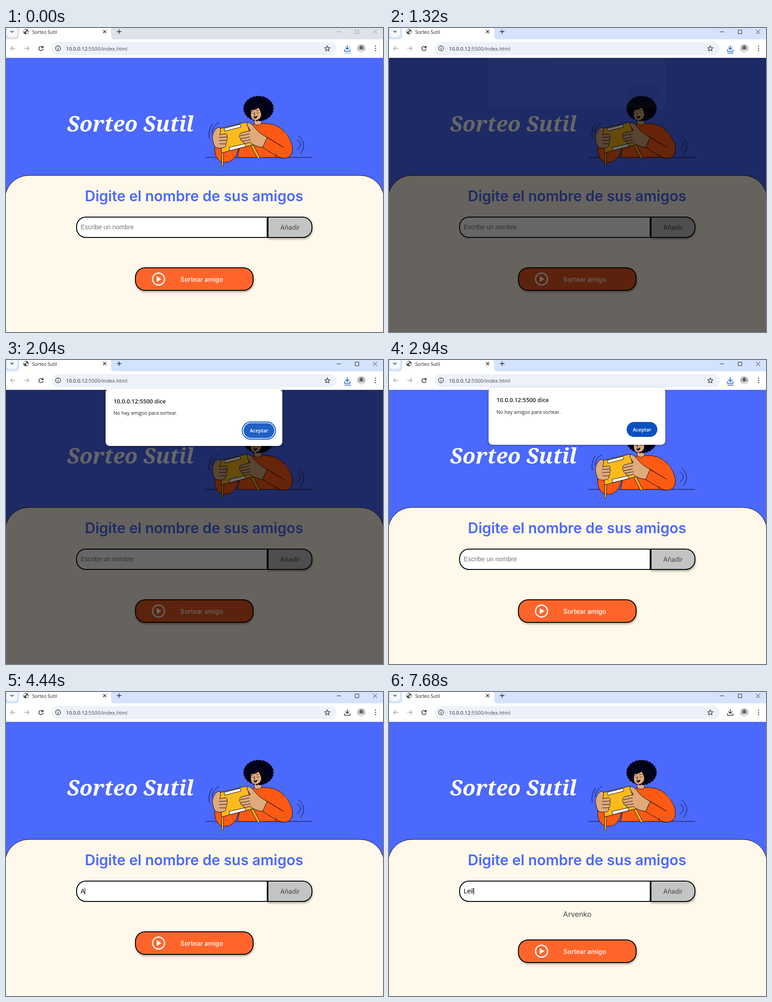
These frames come from a looping animation (833x672 px, 8000 ms). An HTML page:

```html
<!DOCTYPE html>
<html lang="es">
<head>
<meta charset="utf-8">
<title>Sorteo Sutil</title>
<style>
html, body { margin: 0; width: 100%; height: 100%; overflow: hidden; background: #fff9eb; }
svg { display: block; width: 833px; height: 672px; font-optical-sizing: none; }
.ui { font-family: "Open Sans", "Noto Sans", sans-serif; fill: #1f1f1f; }
.inter { font-family: Inter, sans-serif; }
.field { font: 14px "Liberation Sans", Arial, sans-serif; }
.title { font: italic 900 47px "Noto Serif", serif; }
.mid { text-anchor: middle; }
.line { fill: none; stroke-linecap: round; stroke-linejoin: round; }
.art { stroke: #0a0a1c; stroke-width: 1; stroke-linejoin: round; stroke-linecap: round; }
.skin { fill: #e0aa7a; }
.cloth { fill: #ff5a14; }
.wood { fill: #fcba1c; }
.soft { filter: drop-shadow(1px 3px 2px rgba(0, 0, 0, .3)); }
.popup { filter: drop-shadow(0 1px 2px rgba(0, 0, 0, .4)); }
</style>
</head>
<body>
<svg viewBox="0 0 833 672">
  <!-- page -->
  <rect y="66" width="833" height="606" fill="#4b69fd"/>
  <text class="title mid" x="275" y="229" fill="#fff">Sorteo Sutil</text>

  <g class="art">
    <path d="M441 286H676" fill="none"/>
    <path class="cloth" d="M512 286L516 262Q522 230 548 212Q556 216 565 211Q596 209 614 228Q634 250 633 270Q630 288 611 288L597 286Z"/>
    <path class="cloth" d="M461 263Q460 287 474 295Q490 301 502 290Q510 282 514 266L480 262Z"/>
    <path class="skin" d="M549 198L548 211Q556 219 565 211L563 194Z"/>
    <g id="hair" fill="#020218" stroke="none"><ellipse cx="558" cy="178" rx="30" ry="25"/></g>
    <path class="skin" stroke="none" d="M542 181Q552 182 558 176Q563 184 564 192Q562 203 551 204Q542 203 541 193Z"/>
    <path fill="none" stroke-width=".9" d="M543 184L547 183M553 183L558 182M544 188Q546 190 548 188M554 188Q557 190 559 187M550 187L548 192L551 193"/>
    <path d="M547 196Q552 197 555 194Q554 200 550 200Z"/>
    <path class="wood" d="M477 274L476 304Q478 307 480 304L481 273ZM541 260L556 288Q559 290 561 287L546 258Z"/>
    <path class="wood" d="M470 223L532 208L546 258L477 276Z"/>
    <path fill="#fff" d="M482 222L517 213L519 219L484 228ZM493 264L528 256L530 262L495 271Z"/>
    <path class="skin" d="M468 220Q458 226 456 240Q457 256 463 264Q474 267 482 264Q488 260 485 256Q490 253 487 248Q491 244 488 240Q490 234 484 234L472 236Q476 226 473 221Q471 218 468 220Z"/>
    <path fill="none" d="M471 242L487 241M471 249L487 248M472 256L485 256"/>
    <path class="skin" d="M577 242Q560 233 551 222Q541 208 534 209Q530 212 535 219L540 227L523 231Q515 233 517 238Q514 242 519 245Q517 250 524 250Q523 256 530 255L540 253Q547 261 567 264Z"/>
    <path fill="none" d="M519 238L538 234M519 245L538 241M524 250L540 247"/>
    <path class="cloth" d="M577 242L567 264Q590 279 607 287Q626 291 632 276Q632 264 622 262L614 264Z"/>
    <path class="cloth" stroke="none" d="M606 258L616 230Q633 252 632 273L619 276Z"/>
    <path fill="none" d="M577 242L614 264M597 279V286M449 244Q446 226 456 212M455 232Q457 216 470 209M643 247Q658 257 643 270M646 238Q668 257 650 278"/>
  </g>

  <path d="M-2 680V378A52 52 0 0 1 50 326H783A52 52 0 0 1 835 378V680Z" fill="#fff9eb" stroke="#0b0b14"/>
  <text class="inter mid" x="415.5" y="383" font-size="32" font-weight="600" fill="#4b69fd">Digite el nombre de sus amigos</text>

  <path id="add" class="soft" d="M578.500 418H655.500A20.500 20.500 0 0 1 676 438.500V442.500A20.500 20.500 0 0 1 655.500 463H578.500Z" stroke="#000" stroke-width="2"/>
  <path d="M577.500 418H176.500A20.500 20.500 0 0 0 156 438.500V442.500A20.500 20.500 0 0 0 176.500 463H577.500Z" fill="#fff" stroke="#000" stroke-width="2"/>
  <path id="divider" d="M578 417V464" stroke="#000"/>
  <text class="inter mid" x="627.5" y="445.5" font-size="14" fill="#444">Añadir</text>
  <text id="entry" class="field" x="165" y="445"></text>
  <rect id="caret" y="433" width="1" height="15"/>
  <text id="friend" class="inter mid" x="416" y="496.5" font-size="16" fill="#444">Arvenko</text>

  <g id="draw">
    <rect id="drawBox" class="soft" x="286" y="530" width="260" height="50" rx="21.500" stroke="#000" stroke-width="2"/>
    <circle cx="337" cy="555" r="13.2" fill="none" stroke="#fff" stroke-width="2.8"/>
    <path d="M333 548.3L343.5 555L333 561.7Z" fill="#fff"/>
    <text class="inter mid" x="432.5" y="560.5" font-size="14" font-weight="500" fill="#fff">Sortear amigo</text>
  </g>
  <rect id="dim" y="66" width="833" height="606" fill="#000" opacity=".6"/>

  <!-- browser bar -->
  <rect id="strip" width="833" height="26"/>
  <rect x="2" y="-8" width="23" height="28" rx="7" fill="#fff" opacity=".75"/>
  <path d="M20 26Q29 25 29 16V0H232V16Q232 25 241 26Z" fill="#fff"/>
  <rect y="25" width="833" height="41" fill="#fff"/>
  <rect x="101" y="31" width="630" height="29" rx="14.5" fill="#edf2fa"/>
  <path class="line" d="M10 6.5L13 9.5L16 6.5M215 5L221 11M221 5L215 11M245.500 8H254.500M250 3.500V12.500" stroke="#1f1f1f" stroke-width="1.3"/>
  <circle cx="44" cy="8" r="6" fill="#51565c"/>
  <path d="M39 5Q43 2 45 4Q45 7 42 7Q42 9 39 8ZM45 8Q48 6 49 9Q48 12 45 13Q46 10 44 9Z" fill="#fff"/>
  <text class="ui" x="58" y="12.500" font-size="10.2">Sorteo Sutil</text>
  <path id="winButtons" fill="none" d="M731 8.500H740M771.500 4.500H779.500V12.500H771.500ZM811 4L820 13M820 4L811 13"/>
  <path class="line" d="M20 45H10M14.500 40.500L10 45L14.500 49.500M41 45H51M46.500 40.500L51 45L46.500 49.500" stroke="#a3a6aa" stroke-width="1.3"/>
  <path class="line" d="M81.500 43A4.700 4.700 0 1 0 82 46.500M82 40V43.500H78.500" stroke="#2b2e31" stroke-width="1.5"/>
  <g fill="none" stroke="#3a3d40" stroke-width="1.3">
    <circle cx="115" cy="45" r="5.500"/>
    <path d="M115 44V48.200M115 41.500V42.800"/>
    <path id="star" stroke-linejoin="round"/>
  </g>
  <text class="ui" x="132.500" y="49.500" font-size="11.200">10.0.0.12<tspan fill="#45484b">:5500/index.html</tspan></text>
  <g id="download" class="line" stroke-width="1.600">
    <path d="M754 39V47M750 43.500L754 47.500L758 43.500M748 48V51.500H760V48"/>
    <path id="underline" d="M748.500 55.500H760.500"/>
  </g>
  <clipPath id="round"><circle cx="785" cy="45" r="9"/></clipPath>
  <g clip-path="url(#round)">
    <rect x="776" y="36" width="18" height="18" fill="#b9b8b8"/>
    <ellipse cx="785" cy="54" rx="8" ry="6" fill="#dddddd"/>
    <ellipse cx="785" cy="43.500" rx="3.300" ry="4.300" fill="#6d5548"/>
  </g>
  <path d="M816.500 40V50.100" stroke="#3a3d40" stroke-width="2.600" stroke-linecap="round" stroke-dasharray="0 5"/>

  <!-- alert -->
  <g id="alert">
    <rect class="popup" x="220" y="63" width="390.500" height="127" rx="9" fill="#fff"/>
    <text class="ui" x="237.500" y="95.500" font-size="12.800" font-weight="600">10.0.0.12:5500 dice</text>
    <text class="ui" x="237.500" y="121" font-size="10.750">No hay amigos para sortear.</text>
    <rect id="ring" x="522" y="137" width="73.500" height="38" rx="19" fill="none" stroke="#0b57d0" stroke-width="2"/>
    <rect id="accept" x="525" y="139.500" width="68" height="33" rx="16.500"/>
    <text class="ui mid" x="559" y="160" font-size="10.800" font-weight="600" style="fill:#fff">Aceptar</text>
  </g>
</svg>
<script>
const LOOP = 8000;
const $ = id => document.getElementById(id);
const set = (id, attrs) => {
  for (const key in attrs) $(id).setAttribute(key, attrs[key]);
};
const show = (id, on) => set(id, { visibility: on ? "visible" : "hidden" });
const within = (t, from, to) => t >= from && t < to;
const lerp = (a, b, u) => a + (b - a) * u;

const names = [
  { word: "Arvenko", keys: [4440, 4710, 4800, 4890, 4980, 5040, 5130], end: 6150 },
  { word: "Leil", keys: [7140, 7380, 7530, 7680], end: LOOP }
];

function buildArt() {
  for (let i = 0; i < 26; i++) {
    const a = i / 26 * Math.PI * 2;
    const dot = document.createElementNS("http://www.w3.org/2000/svg", "circle");
    dot.setAttribute("cx", 558 + 29.5 * Math.cos(a));
    dot.setAttribute("cy", 178 + 24 * Math.sin(a));
    dot.setAttribute("r", 4.2);
    $("hair").append(dot);
  }
  const points = Array.from({ length: 10 }, (_, i) => {
    const a = i * Math.PI / 5 - Math.PI / 2, r = i % 2 ? 2.8 : 6.3;
    return [710 + r * Math.cos(a), 45.5 + r * Math.sin(a)];
  });
  set("star", { d: "M" + points.join("L") + "Z" });
}

function typed(t) {
  const name = names.find(n => within(t, n.keys[0], n.end));
  return name ? name.word.slice(0, name.keys.filter(k => k <= t).length) : "";
}

function drawField(t) {
  const text = typed(t), entry = $("entry");
  entry.textContent = text || "Escribe un nombre";
  set("entry", { fill: text ? "#000" : "#757575" });
  const caretOn = within(t, 3630, 4140) || within(t, 4440, 5640) ||
    within(t, 6480, 6960) || t >= 7140;
  show("caret", caretOn);
  set("caret", { x: 165 + (text ? Math.round(entry.getComputedTextLength()) : 0) });
  const focused = within(t, 3630, 6090) || t >= 6480;
  set("divider", { "stroke-width": focused ? 3 : 4 });
}

function drawButtons(t) {
  const overAdd = within(t, 270, 330) || within(t, 5850, 6480);
  const overDraw = within(t, 360, 540) || within(t, 690, 2940);
  const added = t >= 6150;
  set("add", { fill: overAdd ? "#a1a1a1" : "#c4c4c4" });
  set("drawBox", { fill: overDraw ? "#e55720" : "#ff652b" });
  set("draw", { transform: `translate(0 ${added ? 18 : 0})` });
  show("friend", added);
}

function drawAlert(t) {
  const closing = t >= 2940;
  const step = Math.floor(t / 30) * 30;
  const u = Math.min(1, Math.max(0, (step - (closing ? 2940 : 1320)) / 150));
  const shift = closing ? lerp(-2.5, -16, u) : lerp(-13, 0, 1 - (1 - u) ** 2);
  show("alert", within(t, 1320, 3090));
  set("alert", {
    opacity: closing ? 1 - u : lerp(.02, 1, u),
    transform: `translate(0 ${shift})`
  });
  set("ring", { opacity: closing ? 0 : 1 });
  set("accept", { fill: closing ? "#0b50c0" : "#2160c4" });
  show("dim", within(t, 1290, 2940));
}

function drawBrowser(t) {
  const active = t >= 1290, fresh = t < 3870;
  set("strip", { fill: active ? "#d3e3fd" : "#dee3ea" });
  set("winButtons", { stroke: active ? "#1f1f1f" : "#92969b" });
  set("download", { stroke: fresh ? "#0b57d0" : "#303336" });
  set("underline", { stroke: active ? "#0b57d0" : "#8ca8d6" });
  show("underline", fresh);
}

function render(t) {
  drawBrowser(t);
  drawField(t);
  drawButtons(t);
  drawAlert(t);
}

buildArt();
const start = performance.now();
function tick() {
  render((performance.now() - start) % LOOP);
  requestAnimationFrame(tick);
}
tick();
</script>
</body>
</html>
```
